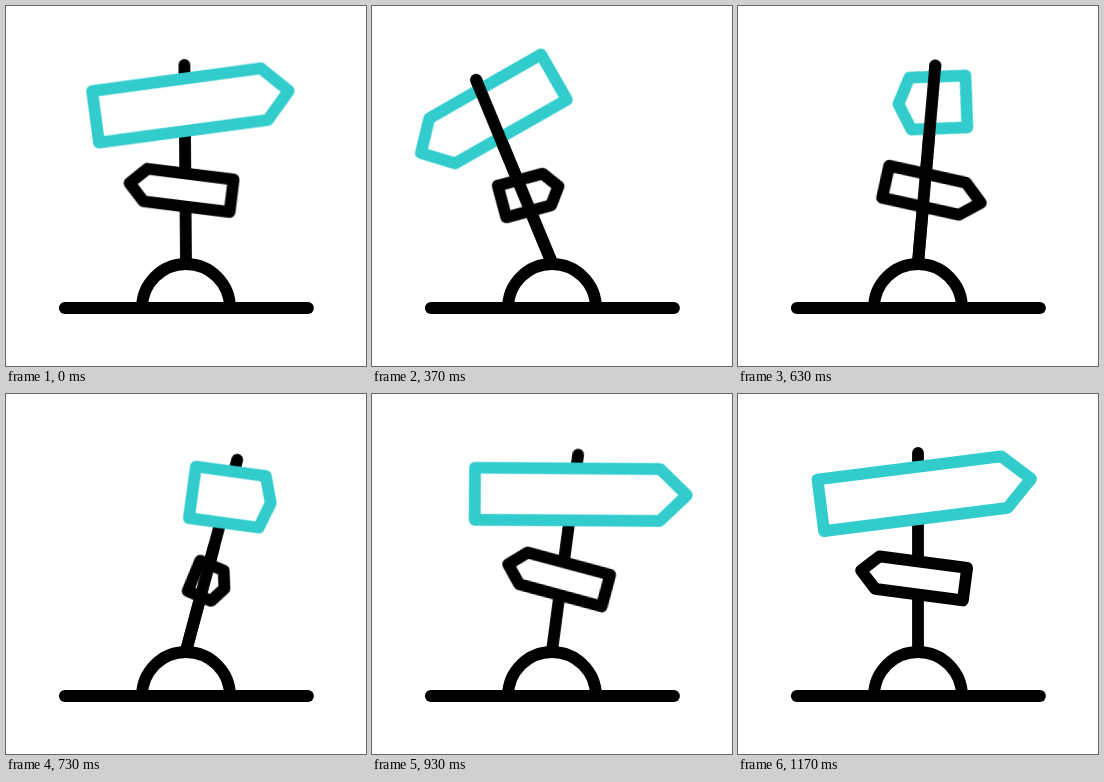
Animation, 360 px wide and 360 px high, one loop 1670 ms. Source, as an HTML page without scripts:

```html
<!DOCTYPE html>
<html lang="en">
<head>
<meta charset="utf-8">
<title>Swinging signpost</title>
<style>
  html, body { margin: 0; width: 100%; height: 100%; overflow: hidden; background: #fff; }
  svg { display: block; width: 100vw; height: 100vh; }

  path { fill: none; stroke: #000; stroke-width: 11.8; stroke-linecap: round; stroke-linejoin: round; }
  .sign { fill: #fff; }
  .big { stroke: #33cccc; }

  /* 2% of the loop is one thirtieth of a second */
  .post, .sign, .over { animation: 1670ms -36ms infinite both; }
  .post { transform-origin: 180px 257px; animation-name: swing; }
  .big { animation-name: turn-big; }
  .small { animation-name: turn-small; }
  .over { animation-timing-function: step-end; }
  .upper { animation-name: cover-big; }
  .lower { animation-name: cover-small; }

  @keyframes swing {
    0% { transform: rotate(0deg); animation-timing-function: cubic-bezier(.333, 0, .4, 1); }
    28% { transform: rotate(-22.9deg); animation-timing-function: cubic-bezier(.333, 0, .667, 1); }
    46% { transform: rotate(15deg); animation-timing-function: cubic-bezier(.333, 0, .667, 1); }
    70%, 100% { transform: rotate(0deg); }
  }

  /* Each board turns around the post: flat end, shoulders and tip change sides */
  @keyframes turn-big {
    0% {
      d: path("M-98 -26 L87 -26 L114 0 L87 26 L-98 26 Z");
      animation-timing-function: cubic-bezier(.35, .1, .7, .64);
    }
    12% {
      d: path("M-9 -28 L14.5 -28 L13.5 -2 L14.5 24 L-9 24 Z");
      animation-timing-function: cubic-bezier(.33, .43, .67, .78);
    }
    24% {
      d: path("M72 -29.7 L-53 -29.7 L-77 -3.7 L-53 22.3 L72 22.3 Z");
      animation-timing-function: cubic-bezier(.33, .33, .6, 1);
    }
    30% {
      d: path("M103 -30.3 L-77 -30.3 L-109 -4.3 L-77 21.7 L103 21.7 Z");
      animation-timing-function: cubic-bezier(.333, 0, .667, 1);
    }
    55.4%, 100% { d: path("M-98 -26 L87 -26 L114 0 L87 26 L-98 26 Z"); }
  }
  @keyframes turn-small {
    0% {
      d: path("M47.4 -16.4 L-41 -16.4 L-57.4 0 L-41 16.4 L47.4 16.4 Z");
      animation-timing-function: cubic-bezier(.37, 0, .64, 1);
    }
    36% {
      d: path("M-45 -16.4 L44 -16.4 L65 0 L44 16.4 L-45 16.4 Z");
      animation-timing-function: cubic-bezier(.4, 0, .6, 1);
    }
    60%, 100% { d: path("M47.4 -16.4 L-41 -16.4 L-57.4 0 L-41 16.4 L47.4 16.4 Z"); }
  }

  /* The post shows in front while a board is behind it */
  @keyframes cover-big {
    0%, 43%, 100% { opacity: 0; }
    13% { opacity: 1; }
  }
  @keyframes cover-small {
    0%, 47.5%, 100% { opacity: 0; }
    19% { opacity: 1; }
  }
</style>
</head>
<body>
<svg viewBox="0 0 360 360">
  <g class="post">
    <path d="M180 59V256"/>
    <g transform="translate(180 99) rotate(-7.2)">
      <path class="sign big" d="M-98 -26 L87 -26 L114 0 L87 26 L-98 26 Z"/>
    </g>
    <g transform="translate(180 184) rotate(7.5)">
      <path class="sign small" d="M47.4 -16.4 L-41 -16.4 L-57.4 0 L-41 16.4 L47.4 16.4 Z"/>
    </g>
    <path class="over upper" d="M180 59V145"/>
    <path class="over lower" d="M180 150V256"/>
  </g>
  <path d="M136 302a44 44 0 0 1 88 0"/>
  <path d="M58.8 302H302"/>
</svg>
</body>
</html>
```
